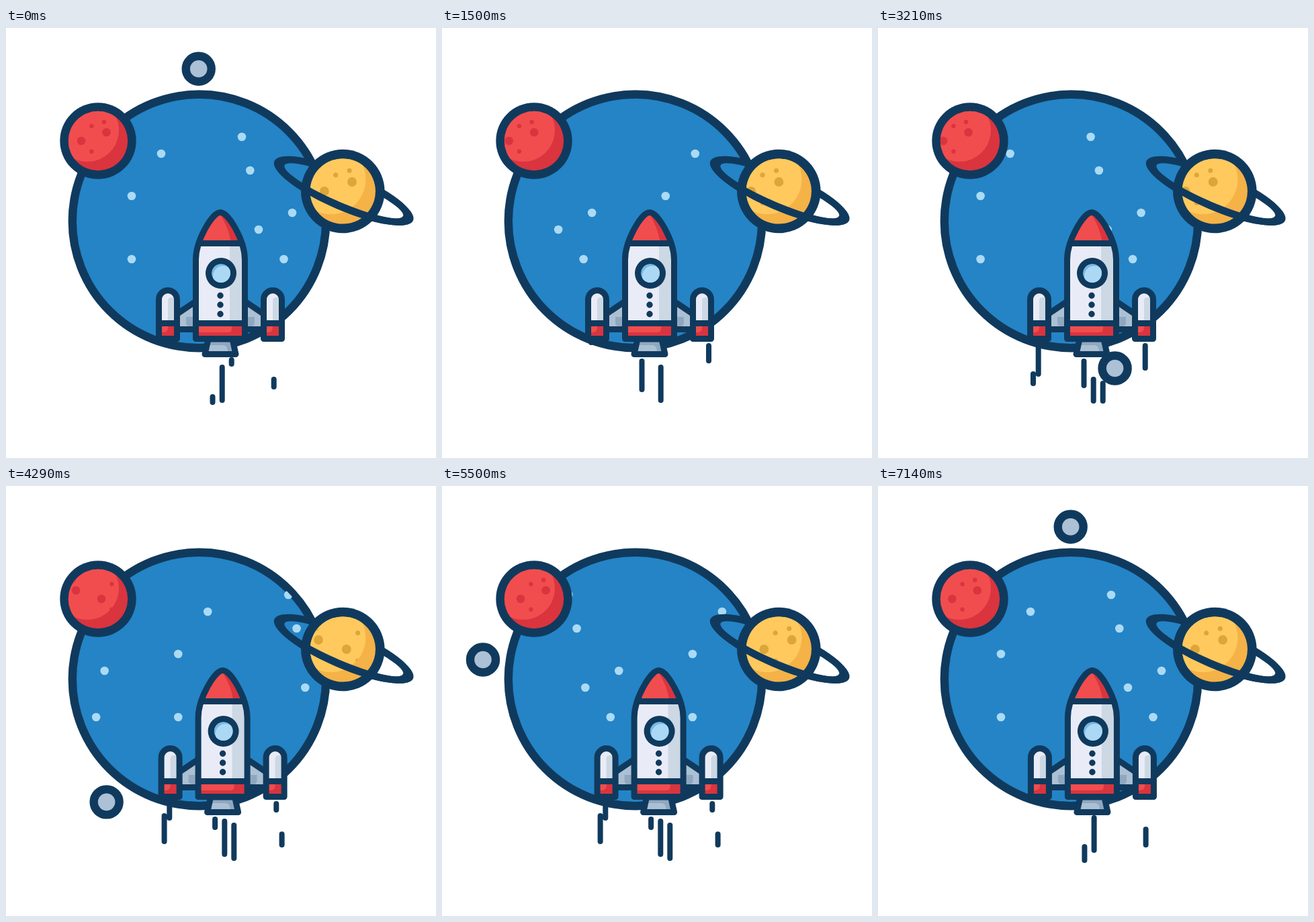
An HTML page that plays this animation: 640 px wide and 640 px high, repeating every 7.21 s.

```html
<!DOCTYPE html>
<html lang="en">
<head>
<meta charset="utf-8">
<title>Rocket</title>
<style>
  html, body { margin: 0; width: 100%; height: 100%; overflow: hidden; background: #fff; }
  svg { display: block; width: 100%; height: 100%; }
  .ink { stroke: #103a5d; stroke-width: 9; stroke-linejoin: round; stroke-linecap: round; }
</style>
</head>
<body>
<svg viewBox="0 0 640 640">
  <defs>
    <clipPath id="sky"><circle cx="287.5" cy="287.5" r="185"/></clipPath>
    <clipPath id="disc"><circle r="44.2"/></clipPath>
    <clipPath id="lit"><circle cx="-16" cy="-16" r="47"/></clipPath>
    <clipPath id="front"><rect x="-120" y="0" width="240" height="40"/></clipPath>
    <clipPath id="glass"><circle cx="320" cy="365" r="14"/></clipPath>
    <path id="hull" d="M282.5 462.5V345C282.5 316 307 274.5 319 274.5S355.5 316 355.5 345V462.5Z"/>
    <clipPath id="hullClip"><use href="#hull"/></clipPath>
    <path id="ring" fill="#103a5d" fill-rule="evenodd"
      d="M-112.3 0A112.3 28.8 0 0 1 112.3 0A112.3 28.8 0 0 1-112.3 0ZM-96 0A96 17.5 0 0 1 96 0A96 17.5 0 0 1-96 0Z"/>
    <g id="strut">
      <path class="ink" fill="#acc0d4" d="M254 426L283 406.5V448.5H254Z"/>
      <path fill="#8fa8c0" d="M268 430H278V444H274Q268 444 268 438Z"/>
    </g>
    <g id="booster">
      <path fill="#e9ecf7" d="M227.5 462.5V404A13.5 13.5 0 0 1 254.5 404V462.5Z"/>
      <path fill="#ccd8e4" d="M241 440V406Q241 401 246 401H254V440Z"/>
      <path fill="#da343f" d="M228 440H254V462H228Z"/>
      <path fill="#f14d4e" d="M228 440H241V446Q241 453 234 453H228Z"/>
      <path class="ink" fill="none" d="M227.5 462.5V404A13.5 13.5 0 0 1 254.5 404V462.5ZM228 439.5H254"/>
    </g>
  </defs>

  <circle cx="287.5" cy="287.5" r="188.7" fill="#2484c6" stroke="#103a5d" stroke-width="12.4"/>
  <g clip-path="url(#sky)"><g id="stars" fill="#abdaf4"></g></g>

  <circle id="moon" r="19" fill="#acc0d6" stroke="#103a5d" stroke-width="12.4"/>

  <g id="red" transform="translate(137 168)"></g>
  <g transform="translate(502.7 242.3) rotate(23.2)"><use href="#ring"/></g>
  <g id="gold" transform="translate(501.3 243) scale(1.1)"></g>
  <g transform="translate(502.7 242.3) rotate(23.2)"><g clip-path="url(#front)"><use href="#ring"/></g></g>

  <g id="rocket">
    <path id="jets" fill="none" stroke="#103a5d" stroke-width="8" stroke-linecap="round"/>
    <use href="#strut"/>
    <use href="#strut" transform="matrix(-1 0 0 1 638 0)"/>
    <path fill="#acc0d4" d="M301 463H337L342 485.5H296Z"/>
    <path fill="#8fa8c0" d="M301 463H337L340 481H330Q330 472 322 472H301Z"/>
    <path class="ink" fill="none" d="M301 463H337L342 485.5H296Z"/>
    <use href="#booster"/>
    <use href="#booster" x="156"/>
    <g clip-path="url(#hullClip)">
      <path fill="#e9ecf7" d="M278 320H360V440H278Z"/>
      <path fill="#ccd8e4" d="M333 320H360V440H333Z"/>
      <path fill="#f14d4e" d="M278 270H360V320H278Z"/>
      <path fill="#da343f" d="M319 270H360V320H335Q331 296 319 278Z"/>
      <path fill="#da343f" d="M278 440H360V462H278Z"/>
      <path fill="#f14d4e" d="M278 440H336V447Q336 453 330 453H278Z"/>
    </g>
    <path class="ink" fill="none" d="M287 320.5H351M283 439.5H355"/>
    <use href="#hull" class="ink" fill="none"/>
    <circle cx="320" cy="365" r="23" fill="#103a5d"/>
    <g clip-path="url(#glass)">
      <circle cx="320" cy="365" r="14" fill="#76b8e3"/>
      <circle cx="323" cy="369" r="15" fill="#abd8f4"/>
    </g>
    <path class="ink" style="stroke-width:9.4" stroke-dasharray="0 13.7" d="M319 398.3V426"/>
  </g>
</svg>
<script>
const $ = id => document.getElementById(id);
const LOOP = 7210, STEP = LOOP / 101, LAST = 214, CYCLE = 36;

// A strip of dots, repeated once to the left so it scrolls seamlessly.
function strip(id, period, laps, lag, dots) {
  const el = $(id), speed = (period * laps - lag) / LAST;
  el.innerHTML = [-period, 0].map(dx => dots.map(([x, y, r]) =>
    `<circle cx="${x + dx}" cy="${y}" r="${r}"/>`).join('')).join('');
  return n => el.setAttribute('transform', `translate(${n * speed % period} 0)`);
}

// A turning planet: shaded disc with craters that show on the lit side only.
function planet(id, outer, light, shade, spot) {
  $(id).innerHTML = `<circle r="${outer}" fill="#103a5d"/>
    <g clip-path="url(#disc)">
      <circle r="45" fill="${shade}"/>
      <circle cx="-16" cy="-16" r="47" fill="${light}"/>
      <g clip-path="url(#lit)"><g id="${id}Spots" fill="${spot}"></g></g>
    </g>`;
  return strip(id + 'Spots', 75.5, 4, 1.7, [[-25, 0, 6.3], [12.5, -12.7, 6.3],
    [-9.7, -22, 3.2], [9, -28, 3.2], [-9.7, 15.7, 3.2]]);
}

const STAR = 6.3;
const scrolls = [
  strip('stars', 348.6, 2, 4, [[351, 162, STAR], [231, 187, STAR], [363.3, 212, STAR], [187, 250, STAR],
    [426, 275, STAR], [376, 300, STAR], [187, 344, STAR], [413.5, 344, STAR]]),
  planet('red', 56.7, '#f14d4e', '#da343f', '#da343f'),
  planet('gold', 56.6, '#ffc95d', '#f4b247', '#dea539')
];

// Exhaust: each lane fires at fixed points of the cycle, its dash runs from top to bottom.
const lanes = [
  { x: 232, top: 468, bottom: 529, fire: [9] },
  { x: 239.7, top: 470, bottom: 515, fire: [17] },
  { x: 307.5, top: 496, bottom: 557, fire: [2, 19] },
  { x: 321.7, top: 494, bottom: 555, fire: [12, 26] },
  { x: 335.7, top: 494, bottom: 555, fire: [11, 35] },
  { x: 398.7, top: 473, bottom: 534, fire: [19.5] },
  { x: 407, top: 473, bottom: 534, fire: [5.3] }
];
const DASH = 49, FLOW = 6;

function jetPath(n) {
  return lanes.flatMap(({ x, top, bottom, fire }) => fire.map(s => {
    const head = top + FLOW * ((n - s + LAST + 2) % CYCLE), tail = head - DASH;
    return tail < bottom ? `M${x} ${Math.max(top, tail)}V${Math.min(bottom, head) + .01}` : '';
  })).join('');
}

// The rocket swings left, overshoots and settles once per cycle.
const swing = [[0, 0], [9, -10], [21, 3.6], [25, -1], [CYCLE, 0]];
function sway(n) {
  const p = n % CYCLE, k = swing.findIndex(([t]) => t > p);
  const [t0, a] = swing[k - 1], [t1, b] = swing[k];
  return a + (b - a) * (1 - Math.cos(Math.PI * (p - t0) / (t1 - t0))) / 2;
}

function draw(ms) {
  const i = Math.min(100, Math.floor((ms % LOOP + 5) / STEP));
  const n = Math.round(2.14 * i + .21);
  const a = n / LAST * 2 * Math.PI;
  scrolls.forEach(move => move(n));
  $('moon').setAttribute('cx', 286.7 + 227.7 * Math.sin(a));
  $('moon').setAttribute('cy', 288.5 - 227.7 * Math.cos(a));
  $('rocket').setAttribute('transform', `translate(${sway(n)} 0)`);
  $('jets').setAttribute('d', jetPath(n));
}

const start = performance.now();
function tick() {
  draw(performance.now() - start);
  requestAnimationFrame(tick);
}
tick();
</script>
</body>
</html>
```
